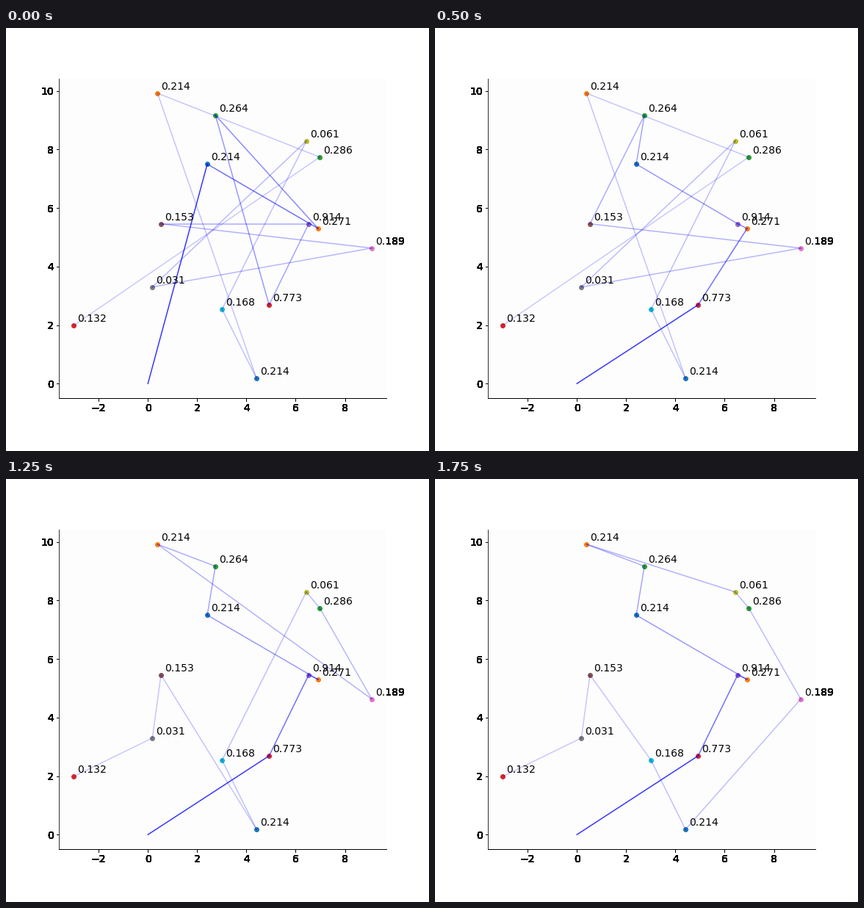
Recreate the animation shown at these times as a matplotlib script. Size 576 by 576 pixels, loop 2250 ms.

```python
import numpy as np
import matplotlib.pyplot as plt
from matplotlib.animation import FuncAnimation

plt.rcParams["font.family"] = "DejaVu Sans"
plt.rcParams["font.size"] = 14

FRAME_MS, FRAMES = 250, 9
OVERPRINTS = 12

# x, y, weight of each stop, in starting order
STOPS = np.array([
    (2.41, 7.50, 0.214), (6.91, 5.30, 0.271), (2.74, 9.17, 0.264),
    (4.92, 2.69, 0.773), (6.53, 5.46, 0.914), (0.53, 5.46, 0.153),
    (9.09, 4.63, 0.189), (0.18, 3.30, 0.031), (6.43, 8.29, 0.061),
    (3.01, 2.54, 0.168), (4.41, 0.18, 0.214), (0.39, 9.92, 0.214),
    (6.98, 7.74, 0.286), (-3.01, 1.99, 0.132),
])
# One exchange of two tour positions per step
SWAPS = [(0, 3), (2, 4), (7, 12), (1, 2), (5, 11), (6, 8), (9, 10)]

HOME = np.zeros((1, 2))
XY = STOPS[:, :2]


def padded(values):
    pad = 0.05 * np.ptp(values)
    return values.min() - pad, values.max() + pad


def tour_at(step):
    tour = np.arange(len(STOPS))
    for a, b in SWAPS[:step]:
        tour[[a, b]] = tour[[b, a]]
    return tour


def add_axes():
    ax = fig.add_axes([0.125, 0.125, 0.775, 0.755], facecolor="#fdfdfd")
    ax.spines[["top", "right"]].set_visible(False)
    xs, ys = np.vstack([HOME, XY]).T
    ax.set(xlim=padded(xs), ylim=padded(ys),
           xticks=range(-2, 9, 2), yticks=range(0, 11, 2))
    return ax


def add_label(ax, stop):
    ax.annotate(f"{stop[2]:.3f}", stop[:2], xytext=(5, 5),
                textcoords="offset points", annotation_clip=False)


fig = plt.figure(figsize=(8, 8), dpi=72, facecolor="white")

# Stacked axes: text outside the plot area overprints and looks heavier
rightmost = STOPS[XY[:, 0].argmax()]
for _ in range(OVERPRINTS):
    add_label(add_axes(), rightmost)

ax = add_axes()
for i, stop in enumerate(STOPS):
    ax.scatter(*stop[:2], color=f"C{i % 10}", zorder=1)
    add_label(ax, stop)

# Legs fade along the tour
legs = [ax.plot([], [], color="blue", lw=1.5, alpha=0.79 / np.sqrt(n))[0]
        for n in range(1, len(STOPS) + 1)]


def update(step):
    route = np.vstack([HOME, XY[tour_at(step)]])
    for n, leg in enumerate(legs):
        leg.set_data(*route[n:n + 2].T)
    return legs


anim = FuncAnimation(fig, update, frames=FRAMES, interval=FRAME_MS,
                     repeat=True, repeat_delay=0, blit=False)
plt.show()
```
